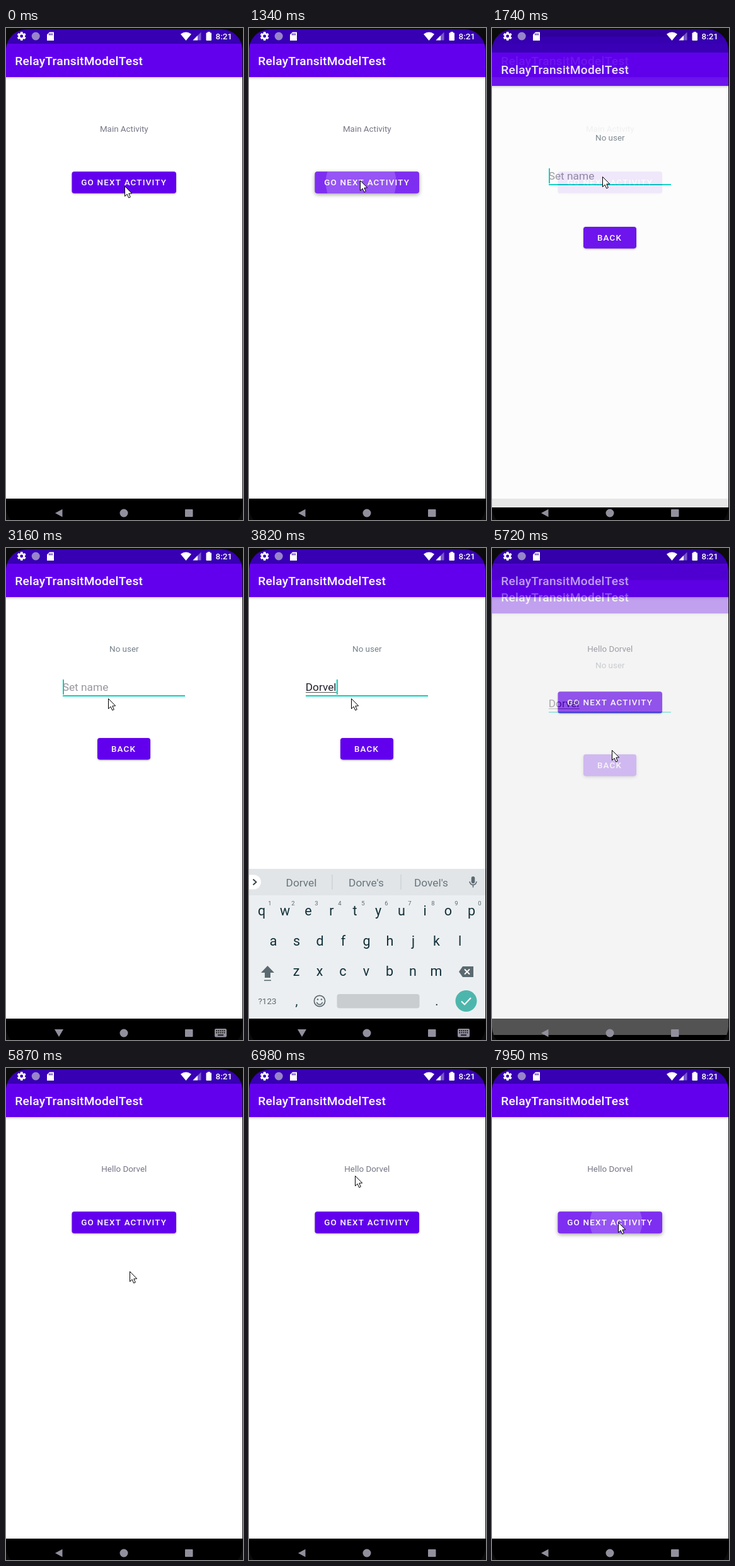
Recreate the animation shown at these times as an HTML page with a canvas. Size 376 by 782 pixels, loop 8 s.

```html
<!DOCTYPE html>
<html lang="en">
<head>
<meta charset="utf-8">
<title>Two screens</title>
<style>
html, body { margin: 0; width: 100%; height: 100%; overflow: hidden; background: #000; }
canvas { display: block; }
</style>
</head>
<body>
<canvas id="stage" width="376" height="782"></canvas>
<script>
const W = 376, H = 782, LOOP = 8000;
const TITLE = 'RelayTransitModelTest', NAME = 'Dorvel';
const PURPLE = '#6200ee', DARK_PURPLE = '#3700b3', TEAL = '#03d0bd', GRAY = '#757685', NAV = '#928f9d';
const stage = document.getElementById('stage').getContext('2d');
const layerCanvas = document.createElement('canvas');
layerCanvas.width = W;
layerCanvas.height = H;
const layer = layerCanvas.getContext('2d');

const PRESSES = [{ t: 1130, x: 176, y: 242 }, { t: 5300, x: 187, y: 320 }, { t: 7810, x: 200, y: 245 }];
const CIRCLE_TIME = 138;
const OPEN = 1652, CLOSE = 5520, SLIDE = 62.5;
const KEYS_IN = 3190, KEYS_OUT = 5440;
const TYPING = [[3430, 1], [3490, 2], [3560, 3], [3760, 5], [3820, 6]];
const POINTER = [
  [0, 188, 251], [270, 176, 242], [1660, 176, 242], [1740, 175, 236], [2020, 165, 240],
  [2290, 162, 239], [4230, 162, 239], [4630, 184, 329], [4770, 184, 329], [4900, 187, 320],
  [5640, 187, 320], [5870, 196, 323], [6080, 201, 187], [6290, 160, 172], [6570, 212, 170],
  [6910, 158, 172], [7190, 218, 165], [7610, 200, 245]
];

const clamp = v => Math.max(0, Math.min(1, v));
const progress = (t, start, length) => clamp((t - start) / length);

function text(c, str, x, y, size, color, { weight = 400, align = 'left', spacing = 0 } = {}) {
  c.font = `${weight} ${size}px Roboto, sans-serif`;
  c.letterSpacing = spacing + 'px';
  c.textAlign = align;
  c.fillStyle = color;
  c.fillText(str, x, y);
}

function rect(c, x, y, w, h, color, r = 0) {
  c.fillStyle = color;
  c.beginPath();
  c.roundRect(x, y, w, h, r);
  c.fill();
}

function disc(c, x, y, r, color) {
  c.fillStyle = color;
  c.beginPath();
  c.arc(x, y, r, 0, Math.PI * 2);
  c.fill();
}

function trace(c, points, close = true) {
  c.beginPath();
  points.forEach(([x, y]) => c.lineTo(x, y));
  if (close) c.closePath();
}

function poly(c, points, color) {
  trace(c, points);
  c.fillStyle = color;
  c.fill();
}

function line(c, points, color, width) {
  trace(c, points, false);
  c.strokeStyle = color;
  c.lineWidth = width;
  c.stroke();
}

function shadow(c, blur, y, alpha, draw) {
  c.save();
  c.shadowColor = `rgba(0,0,0,${alpha})`;
  c.shadowBlur = blur;
  c.shadowOffsetY = y;
  draw();
  c.restore();
}

function button(c, x, y, w, label, labelX, press, t) {
  const h = 34.4;
  const age = press ? t - press.t - CIRCLE_TIME : -1;
  const active = age >= 0 && age < 420;
  const fade = active ? 1 - progress(age, 260, 160) : 0;
  shadow(c, 3 + 3 * fade, 1 + fade, 0.28 + 0.1 * fade, () => rect(c, x, y, w, h, PURPLE, 3.8));
  if (active) {
    const grow = progress(age, 0, 225);
    c.save();
    c.beginPath();
    c.roundRect(x, y, w, h, 3.8);
    c.clip();
    rect(c, x, y, w, h, `rgba(255,255,255,${0.18 * fade})`);
    const cx = press.x - 3 + (x + w / 2 - press.x + 3) * grow;
    disc(c, cx, y + h / 2, 41 + 46 * grow, `rgba(255,255,255,${0.19 * fade})`);
    c.restore();
  }
  text(c, label, labelX, y + 22, 13.4, '#fff', { weight: 500, spacing: 1.2 });
}

function appFrame(c) {
  rect(c, 0, 0, W, H, '#fff');
  shadow(c, 4, 1.2, 0.26, () => rect(c, -10, 25, W + 20, 53, PURPLE));
  rect(c, 0, 0, W, 25, DARK_PURPLE);
  rect(c, 0, 748, W, 34, '#000');
  text(c, TITLE, 14.2, 59, 19.2, '#fff', { weight: 500, spacing: 0.25 });
}

function mainScreen(c, t) {
  appFrame(c);
  const label = t < CLOSE - 60 ? 'Main Activity' : 'Hello ' + NAME;
  text(c, label, 187.3, 165, 13.4, GRAY, { align: 'center' });
  button(c, 104.5, 228.3, 165.5, 'GO NEXT ACTIVITY', 119.3, t < 4000 ? PRESSES[0] : PRESSES[2], t);
}

function typedAt(t) {
  const step = TYPING.filter(([time]) => t >= time).pop();
  return step ? NAME.slice(0, step[1]) : '';
}

function caretOn(t) {
  if (t < 3160) return t < 2200 || t >= 2700;
  return t < 3820 || Math.floor((t - 3820) / 500) % 2 === 0;
}

function nameScreen(c, t) {
  appFrame(c);
  text(c, 'No user', 187.3, 165, 13.4, '#75818a', { align: 'center' });
  const typed = typedAt(t);
  text(c, typed || 'Set name', 89.7, 227.3, 17.3, typed ? '#20202a' : '#96969f');
  const width = typed ? c.measureText(typed).width : 0;
  if (typed) rect(c, 90, 229, width, 1, '#555');
  rect(c, 90, 234, 194, 2, TEAL);
  if (caretOn(t)) rect(c, 90 + width, 209, 2, 24, TEAL);
  button(c, 145, 302, 84, 'BACK', 166.9, PRESSES[1], t);
}

function suggestions(typed) {
  if (typed.length > 5) return [typed, "Dorve's", "Dovel's"];
  if (typed.length > 3) return [typed, 'Drove', 'Dove'];
  return typed ? [typed, 'Do', 'Door'] : [];
}

function keyboard(c, t) {
  const ink = '#12303a', iconGray = '#5b6a70';
  const center = { align: 'center' };
  rect(c, 0, 510, W, 238, '#eceff1');
  rect(c, 0, 510, W, 42, '#e1e5e8');
  suggestions(typedAt(t)).forEach((word, i) => text(c, word, 83 + i * 103, 537.7, 17.3, '#68767c', center));
  for (const x of [131.5, 240.5]) rect(c, x, 519, 1, 24, '#c4cacd');
  rect(c, -12, 519.5, 31, 23, '#fff', 11.5);
  line(c, [[6.5, 526.5], [11.5, 531], [6.5, 535.5]], '#333f44', 1.8);

  rect(c, 352.7, 522, 5.6, 11, iconGray, 2.8);
  c.beginPath();
  c.arc(355.5, 530, 5.4, 0, Math.PI);
  c.strokeStyle = iconGray;
  c.lineWidth = 1.6;
  c.stroke();
  rect(c, 354.7, 535, 1.6, 4.5, iconGray);

  [['qwertyuiop', 20, 583.5], ['asdfghjkl', 38.5, 631.5], ['zxcvbnm', 75, 680]].forEach(([row, x, y], r) => {
    [...row].forEach((key, i) => {
      const keyX = x + i * 37;
      text(c, key, keyX, y, 21.5, ink, center);
      if (!r) text(c, String((i + 1) % 10), keyX + 13, 568, 9.5, '#5b6a70', center);
    });
  });

  poly(c, [[29.5, 664], [40, 675], [34, 675], [34, 683], [25, 683], [25, 675], [19, 675]], iconGray);
  rect(c, 24, 686.5, 11, 1.6, iconGray);
  poly(c, [[333, 673.5], [339, 665], [356, 665], [356, 682], [339, 682]], iconGray);
  line(c, [[342, 669.5], [350, 677.5]], '#fff', 1.8);
  line(c, [[350, 669.5], [342, 677.5]], '#fff', 1.8);

  text(c, '?123', 29, 725, 13.5, iconGray, center);
  text(c, ',', 75.5, 727, 20, ink, center);
  text(c, '.', 298, 727, 20, ink, center);
  c.strokeStyle = iconGray;
  c.lineWidth = 1.7;
  c.beginPath();
  c.arc(112, 720, 8.6, 0, Math.PI * 2);
  c.stroke();
  c.beginPath();
  c.arc(112, 721, 4.6, 0.2, Math.PI - 0.2);
  c.stroke();
  disc(c, 109, 717.5, 1.3, iconGray);
  disc(c, 115, 717.5, 1.3, iconGray);
  rect(c, 139.5, 709, 131, 22.5, '#c9cdd0', 4);
  disc(c, 344.5, 720, 17, '#4db6ac');
  line(c, [[337, 720.5], [342, 725.5], [352, 715]], '#fff', 2);
}

function statusIcons(c) {
  disc(c, 24.7, 13, 5.2, '#fff');
  for (let i = 0; i < 6; i++) {
    c.save();
    c.translate(24.7, 13);
    c.rotate(i * Math.PI / 3);
    rect(c, -1.9, -7, 3.8, 4, '#fff', 0.8);
    c.restore();
  }
  disc(c, 24.7, 13, 2.4, DARK_PURPLE);
  disc(c, 47.2, 13, 6.5, '#9785c9');
  poly(c, [[69, 6.5], [76, 6.5], [76, 20], [65, 20], [65, 10.5]], '#fff');
  for (const x of [68, 70.3, 72.6]) rect(c, x, 8.5, 1.2, 3, DARK_PURPLE);

  c.fillStyle = '#fff';
  c.beginPath();
  c.moveTo(285.5, 20);
  c.lineTo(277, 9.7);
  c.quadraticCurveTo(285.5, 3.2, 294, 9.7);
  c.fill();
  poly(c, [[296.5, 19.5], [309.5, 6.5], [309.5, 19.5]], 'rgba(255,255,255,.35)');
  poly(c, [[296.5, 19.5], [304, 12], [304, 19.5]], '#fff');
  rect(c, 317.5, 7.5, 8.5, 12.5, '#fff', 1);
  rect(c, 319.7, 6, 4, 2, '#fff');
  text(c, '8:21', 332.6, 18.3, 13.4, '#fff', { weight: 500 });
}

function navIcons(c, t) {
  const typing = t >= 3155 && t < KEYS_OUT;
  poly(c, typing ? [[77, 765], [91, 765], [84, 777]] : [[78, 771], [89.5, 764.7], [89.5, 777.3]], NAV);
  disc(c, 187, 771, 6.5, NAV);
  rect(c, 284, 765, 12.5, 12, NAV, 1);
  if (!typing) return;
  rect(c, 331, 764, 19, 13.5, NAV, 2);
  for (let i = 0; i < 10; i++) rect(c, 333.2 + i % 5 * 3.1, 766.3 + Math.floor(i / 5) * 3.2, 1.8, 1.8, '#111');
  rect(c, 336, 773.3, 9, 1.8, '#111');
}

// The phone's screen runs a little past the bottom of the stage.
function bezel(c) {
  c.fillStyle = '#0b0b0b';
  c.beginPath();
  c.rect(-1, -1, W + 2, H + 20);
  c.roundRect(0, 2, 375, 792, 33);
  c.fill('evenodd');
}

function pointerAt(t) {
  const next = POINTER.findIndex(([time]) => time > t);
  if (next < 0) return POINTER[POINTER.length - 1].slice(1);
  const [t0, x0, y0] = POINTER[next - 1], [t1, x1, y1] = POINTER[next];
  const p = progress(t, t0, t1 - t0), k = p * p * (3 - 2 * p);
  return [x0 + (x1 - x0) * k, y0 + (y1 - y0) * k];
}

function pointer(c, t) {
  const [x, y] = pointerAt(t);
  c.save();
  c.translate(Math.round(x) + 0.5, Math.round(y) + 0.5);
  poly(c, [[0, 0], [0, 16], [3.6, 12.6], [6.2, 18.4], [8.8, 17.2], [6.3, 11.6], [11.2, 11.4]], '#fff');
  c.strokeStyle = '#000';
  c.lineWidth = 1;
  c.stroke();
  c.restore();
}

// Offset and opacity of the second screen, and how far the first one is dimmed behind it.
function transition(t) {
  if (t < OPEN || t >= CLOSE + 250) return null;
  if (t < CLOSE) {
    return {
      y: SLIDE * (1 - progress(t, OPEN, 350)) ** 5,
      alpha: 1 - (1 - progress(t, OPEN, 200)) ** 4,
      dim: 0.3 * progress(t, OPEN, 217)
    };
  }
  const p = progress(t, CLOSE, 250);
  return { y: SLIDE * p ** 4, alpha: 1 - progress(t, CLOSE + 100, 150), dim: 0.3 * (1 - p) };
}

function drawLayer(draw, y, alpha) {
  layer.clearRect(0, 0, W, H);
  draw(layer);
  stage.globalAlpha = alpha;
  stage.drawImage(layerCanvas, 0, Math.round(y));
  stage.globalAlpha = 1;
}

function drawKeyboard(t) {
  if (t < KEYS_IN || t > KEYS_OUT + 150) return;
  const enter = progress(t, KEYS_IN, 250), leave = progress(t, KEYS_OUT, 150);
  stage.save();
  stage.beginPath();
  stage.rect(0, 0, W, 748);
  stage.clip();
  drawLayer(c => keyboard(c, t), 75 * ((1 - enter) ** 5 + leave ** 5), enter * (1 - leave));
  stage.restore();
}

function render(t) {
  mainScreen(stage, t);
  const second = transition(t);
  if (second) {
    rect(stage, 0, 0, W, H, `rgba(0,0,0,${second.dim})`);
    drawLayer(c => nameScreen(c, t), second.y, second.alpha);
  }
  drawKeyboard(t);
  statusIcons(stage);
  navIcons(stage, t);
  bezel(stage);
  const press = PRESSES.find(p => t >= p.t && t < p.t + CIRCLE_TIME);
  if (press) disc(stage, press.x, press.y, 12, 'rgba(240,215,30,.58)');
  pointer(stage, t);
}

const start = performance.now();
function tick() {
  render((performance.now() - start) % LOOP);
  requestAnimationFrame(tick);
}
tick();
</script>
</body>
</html>
```
